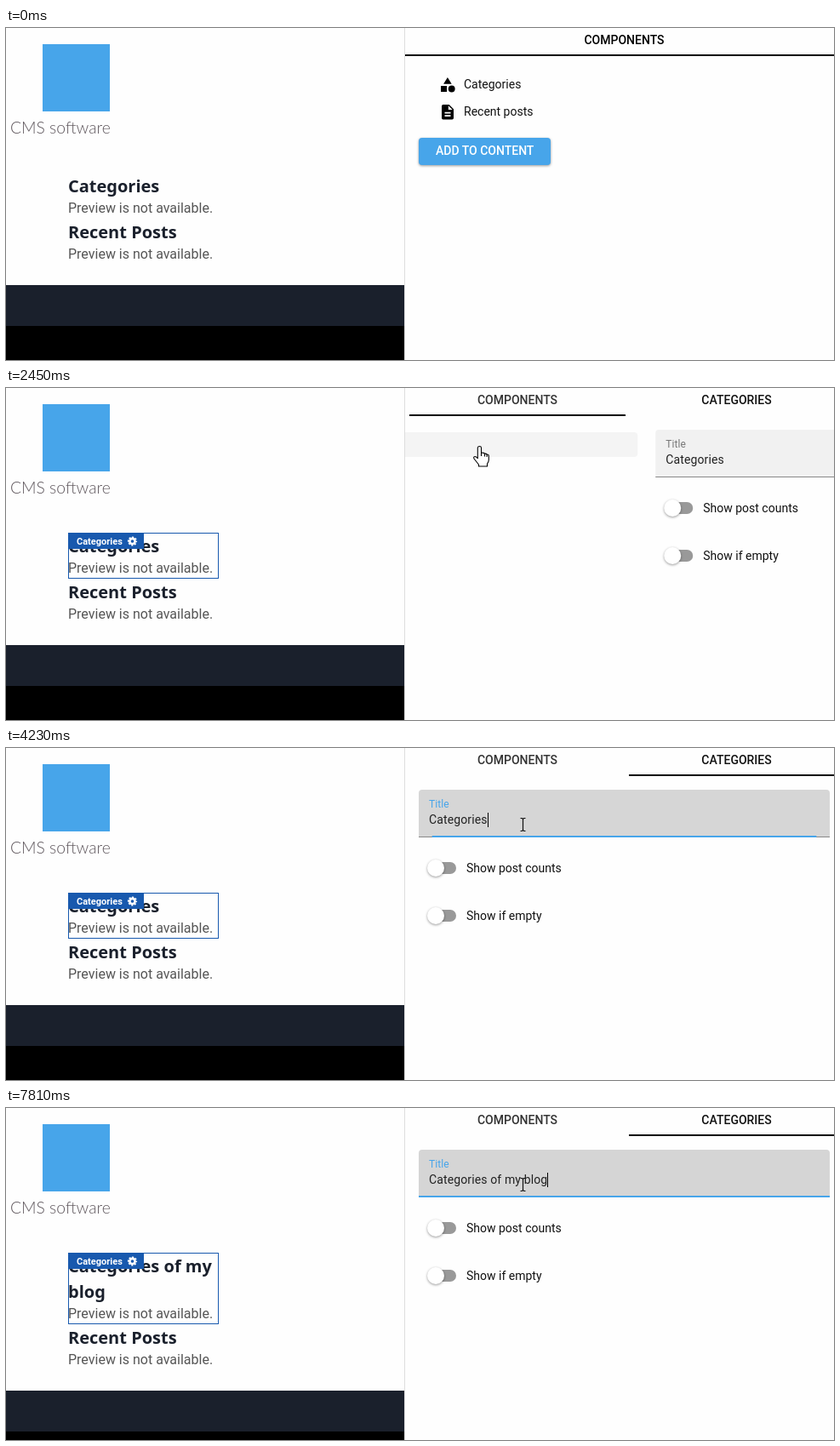
An HTML page that plays this animation: 973x390 px, repeating every 8000 ms.

```html
<!DOCTYPE html>
<html lang="en">
<head>
<meta charset="utf-8">
<title>Component editor</title>
<style>
html, body { margin: 0; width: 100%; height: 100%; overflow: hidden; background: #fefefe; }
svg { display: block; width: 973px; height: 390px; }
text { font: 14px Roboto, sans-serif; fill: #111; white-space: pre; }
.tab { font-weight: 500; text-anchor: middle; }
.head { font: 600 20px "Noto Sans", sans-serif; fill: #1a202c; }
.sub { font-size: 16px; fill: #555; }
.shade { filter: drop-shadow(0 1px 1.5px rgba(0,0,0,.4)); }
.pointer { fill: #fff; stroke: #000; stroke-width: 1.1; stroke-linejoin: round; }
</style>
</head>
<body>
<svg viewBox="0 0 973 390" xmlns="http://www.w3.org/2000/svg">
  <defs>
    <clipPath id="panel"><rect x="469" width="504" height="390"/></clipPath>
    <g id="switch">
      <rect x="499" y="134" width="30" height="14" rx="7" fill="#999"/>
      <circle class="shade" cx="505" cy="141" r="10" fill="#fff"/>
    </g>
  </defs>
  <rect width="973" height="390" fill="#fefefe"/>

  <!-- page preview -->
  <rect x="43" y="19" width="79" height="79" fill="#47a5ea"/>
  <text x="5" y="123.5" style="font:300 19.3px Lato,sans-serif;fill:#5f575d">CMS software</text>
  <text class="head" id="line1" x="73" y="193"></text>
  <text class="head" id="line2" x="73" y="223"></text>
  <g id="below">
    <text class="sub" x="73" y="217">Preview is not available.</text>
    <text class="head" x="73" y="247">Recent Posts</text>
    <text class="sub" x="73" y="271">Preview is not available.</text>
    <rect y="302" width="468" height="48" fill="#1a202c"/>
    <rect y="350" width="468" height="60" fill="#000"/>
  </g>
  <g id="block">
    <rect id="outline" x="73.5" y="170.5" width="176" height="53" fill="none" stroke="#1859ae"/>
    <rect x="73" y="170" width="89" height="19" fill="#1859ae"/>
    <text x="83" y="184" style="font-size:11px;font-weight:700;fill:#fff">Categories</text>
    <g fill="none" stroke="#fff" transform="translate(148.5 180)">
      <circle r="3.1" stroke-width="2.6"/>
      <circle r="4.7" stroke-width="1.8" stroke-dasharray="2.1 1.591" stroke-dashoffset="1.05"/>
    </g>
  </g>
  <rect x="468" width="1" height="390" fill="#ddd"/>

  <!-- side panel -->
  <g clip-path="url(#panel)">
    <text class="tab" id="tabA" y="19">COMPONENTS</text>
    <text class="tab" id="tabB" x="858.5" y="19">CATEGORIES</text>
    <rect id="ink" y="31" height="2" fill="#000"/>
    <g id="list">
      <rect id="rowA" x="485" y="52" width="483" height="29" rx="4" fill="#f4f4f4"/>
      <rect id="rowB" x="485" y="84" width="483" height="29" rx="4" fill="#f4f4f4"/>
      <g transform="translate(508.4 56.2) scale(.875)">
        <path d="M12 2L6.5 11H17.5ZM3 13.5H11V21.5H3Z"/><circle cx="17.5" cy="17.5" r="4.5"/>
      </g>
      <path transform="translate(508.5 88.2) scale(.875)" fill-rule="evenodd"
        d="M14 2H6Q4 2 4 4V20Q4 22 6 22H18Q20 22 20 20V8ZM16 18H8V16H16ZM16 14H8V12H16ZM13 9V3.5L18.5 9Z"/>
      <text x="538" y="71">Categories</text>
      <text x="538" y="103">Recent posts</text>
      <rect class="shade" id="button" x="485" y="129" width="155" height="32" rx="4"/>
      <text x="505" y="149" style="font-weight:500;fill:#fff">ADD TO CONTENT</text>
    </g>
    <g id="form">
      <path id="field" d="M485 105V53Q485 49 489 49H964Q968 49 968 53V105Z"/>
      <rect x="485" y="104" width="483" height="1" fill="#888"/>
      <rect id="active" y="103" height="2" fill="#47a5ea"/>
      <text id="label" x="497" y="70" style="font-size:12px;letter-spacing:.1px">Title</text>
      <text id="value" x="497" y="89" style="letter-spacing:.009em;fill:#222"></text>
      <rect id="caret" y="76" width="1" height="17" fill="#000"/>
      <use href="#switch"/>
      <text x="541" y="146">Show post counts</text>
      <use href="#switch" y="56"/>
      <text x="541" y="202">Show if empty</text>
    </g>
  </g>

  <path class="pointer" id="arrow" d="M0 0V17L4 13.2L6.7 19.3L9 18.3L6.4 12.3H12Z"/>
  <g class="pointer" id="hand">
    <path d="M-2.2 1.8Q-2 0 0 0T2 1.8V7.5L4 7.6Q5.5 7.6 6 8.7Q8 8.3 8.5 9.6Q10.8 9.3 10.8 11.5V16Q10.8 18 9 20.5V23.5H-1V21.5L-6.5 14.5Q-7.5 12.3 -5.5 12Q-4.2 11.9 -2.2 14.2Z"/>
    <path fill="none" d="M2 7.5V11.5M6 8.7V12M8.6 9.6V12.5"/>
  </g>
  <path id="beam" fill="none" stroke="#111" stroke-width="1.2"
    d="M-3 -7.5H-1.2L0 -6.5L1.2 -7.5H3M0 -6.5V6.5M-3 7.5H-1.2L0 6.5L1.2 7.5H3"/>
</svg>
<script>
const LOOP = 8000, SLIDE = 504;
const el = {};
document.querySelectorAll('svg [id]').forEach(e => el[e.id] = e);

const part = (t, a, b) => Math.min(1, Math.max(0, (t - a) / (b - a)));
const mix = (a, b, k) => a + (b - a) * k;
const ease = k => k < .5 ? 4 * k ** 3 : 1 - 4 * (1 - k) ** 3;
const soft = k => k * k * (3 - 2 * k);
const set = (e, attrs) => { for (const k in attrs) e.setAttribute(k, attrs[k]); };
const show = (e, on) => e.style.display = on ? '' : 'none';
const move = (e, x, y) => e.setAttribute('transform', `translate(${x} ${y})`);
const gray = v => `rgb(${v},${v},${v})`;

const ADDED = ' of my blog';
const KEYS = [5870, 6100, 6250, 6480, 6950, 7030, 7260, 7340, 7410, 7640, 7810];
const BLINKS = [4000, 4540, 5090, 5550, 5870];

function drawPreview(t, typed) {
  const wrap = typed.length > 17;
  el.line1.textContent = wrap ? typed.slice(0, 16) : typed;
  el.line2.textContent = wrap ? typed.slice(17) : '';
  move(el.below, 0, wrap ? 30 : 0);
  el.outline.setAttribute('height', wrap ? 83 : 53);
  show(el.block, t >= 2210);
}

function drawTabs(t) {
  const two = t >= 2210;
  el.tabA.setAttribute('x', two ? 601 : 726.5);
  el.tabA.style.fill = two ? '#333' : '#000';
  show(el.tabB, two);
  set(el.ink, two
    ? { x: mix(474, 732, ease(part(t, 2490, 3000))), width: 254 }
    : { x: 469, width: 504 });
  const k = ease(part(t, 2210, 2710));
  move(el.list, -SLIDE * k, 0);
  move(el.form, SLIDE * (1 - k), 0);
  show(el.form, two);
}

function drawField(t, typed) {
  const hover = part(t, 2400, 2600), k = 1 - (1 - part(t, 4000, 4310)) ** 2;
  el.field.setAttribute('fill', gray(Math.round(mix(mix(245, 231, hover), 213, k))));
  set(el.active, { x: 726.5 - 241.5 * k, width: 483 * k });
  el.label.style.fill = t < 4000 ? '#777' : '#47a5ea';
  el.value.textContent = typed;
  el.caret.setAttribute('x', Math.round(497 + el.value.getComputedTextLength()));
  show(el.caret, BLINKS.filter(b => t >= b).length % 2);
}

function drawPointer(t) {
  const a = soft(part(t, 220, 980));
  move(el.arrow, mix(811, 522, a), mix(372, 164, a));
  show(el.arrow, t >= 220 && t < 1060);

  const h = soft(part(t, 1060, 1640)), y = mix(139, 68.5, h);
  const pointing = t >= 1060 && t < 2500;
  move(el.hand, mix(528, 556.5, h), y);
  show(el.hand, pointing);
  const over = (top, end) => pointing && y >= top && y <= end;
  show(el.rowA, over(52, 81));
  show(el.rowB, over(84, 113));
  el.button.setAttribute('fill', over(129, 161) ? '#51adeb' : '#47a5ea');

  const b = soft(part(t, 3070, 3620));
  move(el.beam, mix(557.5, 607.5, b), mix(68, 90, b));
  show(el.beam, t >= 2500);
}

function draw(t) {
  const typed = 'Categories' + ADDED.slice(0, KEYS.filter(k => t >= k).length);
  drawPreview(t, typed);
  drawTabs(t);
  drawField(t, typed);
  drawPointer(t);
}

const start = performance.now();
function tick() {
  draw((performance.now() - start) % LOOP);
  requestAnimationFrame(tick);
}
tick();
</script>
</body>
</html>
```
